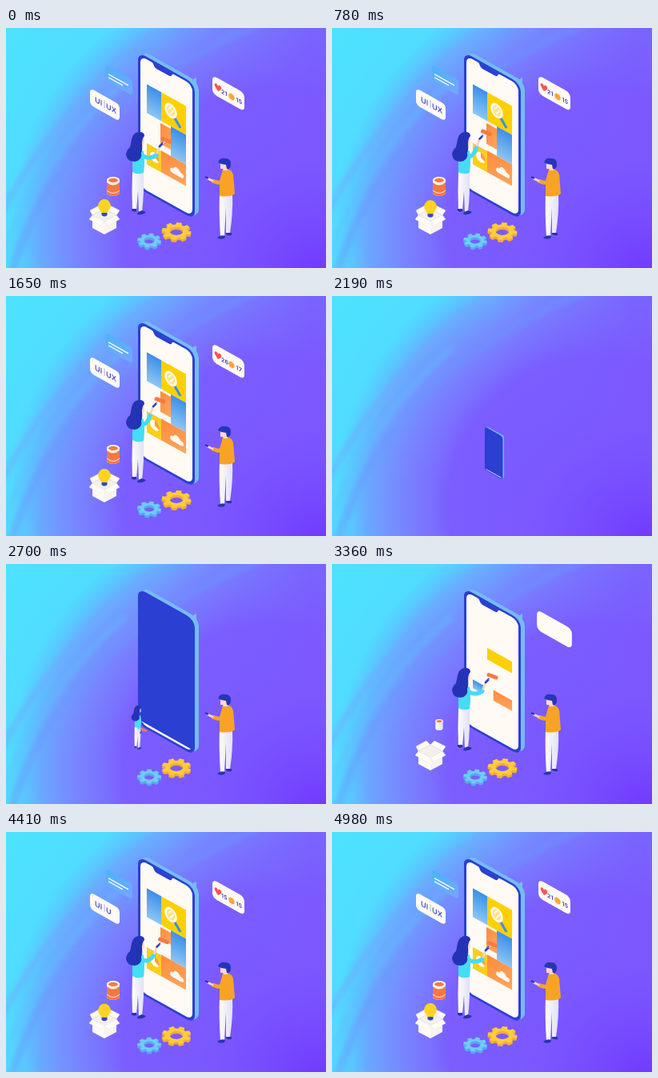
An HTML page for the animation above (5010 ms loop, 400 px wide and 300 px high).

```html
<!DOCTYPE html>
<html lang="en">
<head>
<meta charset="utf-8">
<title>Isometric app design</title>
<style>
html, body { margin: 0; width: 100%; height: 100%; overflow: hidden; background: #7b5dff; }
svg { display: block; width: 100vw; height: 100vh; }
text { font-family: Inter, Lato, sans-serif; font-weight: 500; fill: #3038c0; }
#counts text { font-size: 7px; font-weight: 600; letter-spacing: .2px; }
</style>
</head>
<body>
<svg viewBox="0 0 400 300">
<defs>
  <radialGradient id="sky" gradientUnits="userSpaceOnUse" cx="330" cy="260" r="430">
    <stop offset="0" stop-color="#7a54ff"/><stop offset=".43" stop-color="#7b5eff"/>
    <stop offset=".48" stop-color="#7a70ff"/><stop offset=".56" stop-color="#7884ff"/>
    <stop offset=".62" stop-color="#7297ff"/><stop offset=".67" stop-color="#68aaff"/>
    <stop offset=".71" stop-color="#5bc4ff"/><stop offset=".76" stop-color="#50dcff"/>
    <stop offset="1" stop-color="#4ce4ff"/>
  </radialGradient>
  <linearGradient id="dusk"><stop offset=".5" stop-color="#7a60ff" stop-opacity="0"/><stop offset=".95" stop-color="#7b58ff" stop-opacity=".8"/></linearGradient>
  <radialGradient id="corner" gradientUnits="userSpaceOnUse" cx="390" cy="310" r="170"><stop offset="0" stop-color="#7038ff"/><stop offset="1" stop-color="#7a54ff" stop-opacity="0"/></radialGradient>
  <linearGradient id="blue" x2="0" y2="1"><stop offset="0" stop-color="#3d8fe8"/><stop offset="1" stop-color="#8cc6f4"/></linearGradient>
  <linearGradient id="orange" x2="1" y2="1"><stop offset="0" stop-color="#ff8a3c"/><stop offset="1" stop-color="#ffa75e"/></linearGradient>
  <linearGradient id="glass" x2="1" y2="1"><stop offset="0" stop-color="#46b4f8"/><stop offset="1" stop-color="#78a8ff"/></linearGradient>
  <linearGradient id="cloth" x2="1"><stop offset="0" stop-color="#fffdfa"/><stop offset="1" stop-color="#dfe0f6"/></linearGradient>
  <filter id="soft" x="-20%" y="-20%" width="140%" height="140%"><feGaussianBlur stdDeviation="3"/></filter>
  <clipPath id="wipe"><rect id="wipeRect" x="0" width="72"/></clipPath>
  <clipPath id="canBody"><path d="M126 190V206A8 4 0 0 0 142 206V190Z"/></clipPath>
</defs>

<rect width="400" height="300" fill="url(#sky)"/>
<rect width="400" height="300" fill="url(#dusk)"/>
<rect width="400" height="300" fill="url(#corner)"/>
<g fill="none" filter="url(#soft)">
  <path d="M-10 240Q60 100 205 -10" stroke="#70a8ff" stroke-width="7" opacity=".6"/>
  <path d="M5 310Q60 130 240 32T420 -5" stroke="#6c96ff" stroke-width="10" opacity=".45"/>
  <path d="M-10 300Q40 160 150 65" stroke="#5cc0ff" stroke-width="8" opacity=".4"/>
</g>

<g id="phone">
  <rect width="71" height="169" rx="10" fill="#74bcf0" transform="matrix(1 .56 0 1 170 28)"/>
  <path d="M232 65L238 62V233L233 235Z" fill="#74bcf0"/>
  <g transform="matrix(1 .56 0 1 165 32)">
    <rect y="-2" width="71" height="170" rx="10" fill="#2b3fd2"/>
    <g clip-path="url(#wipe)">
      <rect x="3" y="1" width="65" height="164" rx="8" fill="#fffaf3"/>
      <path d="M17 .5H45Q43 1 42 4Q41 6 39 6H23Q21 6 20 4Q19 1 17 .5Z" fill="#2b3fd2"/>
    </g>
    <rect id="tileA" fill="url(#blue)"/>
    <rect id="tileB" fill="#ffd000"/>
    <rect id="tileC" fill="url(#blue)"/>
    <rect id="tileD" fill="url(#blue)"/>
    <rect id="tileE" fill="#ffcf18"/>
    <rect id="tileF" fill="url(#orange)"/>
    <rect id="paint" x="28" y="71" width="13" fill="url(#orange)"/>
    <g id="lens">
      <path d="M46 55L52 62" stroke="#3f8fe8" stroke-width="4" stroke-linecap="round"/>
      <ellipse cx="41" cy="48.5" rx="6.5" ry="7.5" fill="#ffe58a" stroke="#fffaf3" stroke-width="2.6"/>
      <path d="M38 48L42 43M40 53L45 46" stroke="#fffaf3" stroke-width="1.4"/>
    </g>
    <g id="pie"><circle cx="21" cy="118" r="6" fill="#fffaf3"/><path d="M21 118V112A6 6 0 0 1 26 121Z" fill="#ff9c3b"/></g>
    <path id="cloud" d="M43 125Q40 125 40 122Q41 118 44 119Q46 114 50 116Q52 117 53 119Q57 119 57 122Q57 125 54 125Z" fill="#fffaf3"/>
  </g>
</g>

<g id="gears"></g>

<g id="can">
  <path d="M126 190V206A8 4 0 0 0 142 206V190Z" fill="url(#cloth)"/>
  <g clip-path="url(#canBody)">
    <path id="label" fill="#f57843"/>
    <path d="M126 203Q134 210 142 203" fill="none" stroke="#ffe3d3"/>
  </g>
  <ellipse cx="134" cy="190" rx="8" ry="4" fill="#fffaf3"/>
  <ellipse cx="134" cy="190.3" rx="5.8" ry="2.6" fill="#f57843"/>
</g>

<g id="box">
  <path d="M108 234L123 226L138 234L123 242Z" fill="#f5f0ec"/>
  <path d="M108 234L123 226L118 221L105 228ZM138 234L123 226L128 221L142 228Z" fill="#fffaf3" stroke="#ebe4e0" stroke-width=".5"/>
  <g id="bulb">
    <path d="M119.5 6H126.5V12Q123 15 119.5 12Z" fill="#3148c8"/>
    <path d="M123 -8A8 8 0 0 1 129 5Q127 7 127 9H119Q119 7 117 5A8 8 0 0 1 123 -8Z" fill="#ffd321"/>
  </g>
  <path d="M108 234L123 242V258L108 250Z" fill="#fffaf3"/>
  <path d="M138 234L123 242V258L138 250Z" fill="#f8f3ee"/>
  <path d="M108 234L123 242L118 247L104 239ZM138 234L123 242L128 247L142 239Z" fill="#fffdf8" stroke="#ebe4e0" stroke-width=".5"/>
</g>

<g id="note"><g transform="matrix(1 .56 0 1 125 46)">
  <rect width="33" height="20" rx="4" fill="url(#glass)" opacity=".9"/>
  <path id="lines" fill="none" stroke="#fff" stroke-width="1.4"/>
</g></g>
<g id="title"><g transform="matrix(1 .56 0 1 105 75)">
  <rect width="37" height="21" rx="5" fill="#fffaf3"/>
  <text id="word1" x="6" y="14" font-size="9"></text>
  <path id="caret" d="M18 5.5V15" stroke="#8d9be8" stroke-width=".8"/>
  <text id="word2" x="20" y="14" font-size="9"></text>
</g></g>
<g id="likes"><g transform="matrix(1 .56 0 1 258 59)">
  <rect width="40" height="23" rx="5.5" fill="#fffaf3"/>
  <g id="counts">
    <path d="M7 16Q0 10 4 8Q6 7 7 10Q8 7 10 8Q14 10 7 16Z" fill="#f45656"/>
    <text id="hearts" x="11" y="16"></text>
    <circle cx="24" cy="13.5" r="3.8" fill="#ffa538"/>
    <text id="smiles" x="29.5" y="16"></text>
  </g>
</g></g>

<g id="man">
  <path d="M267 207H283Q284 230 280 256L275 257L275 224L273 260L268 261Q266 230 267 207Z" fill="url(#cloth)"/>
  <path d="M264 262Q269 258 274 260L273 263Q267 265 264 262ZM275 256H282V259Q279 260 275 258Z" fill="#2934af"/>
  <path d="M271 177Q281 174 284 183L286 207Q281 212 267 210L267 191Z" fill="#f9a326"/>
  <path d="M271 184Q274 195 264 193L258 191" fill="none" stroke="#f9a326" stroke-width="5"/>
  <path d="M258 191L252 188" stroke="#ffd2bd" stroke-width="2.8" stroke-linecap="round"/>
  <path d="M249 186L253 188" stroke="#2934af" stroke-width="2.5"/>
  <path d="M268 168H277V178H272L271 176H268Z" fill="#ffd9cb"/>
  <path d="M265 168Q267 162 274 163Q282 163 281 172Q280 177 276 176L275 171Q270 171 265 168Z" fill="#2636b6"/>
</g>

<g id="woman">
  <g transform="translate(-3 0)">
    <path d="M161 180H175Q176 204 173 230H169L168 204L166 228H161Q160 204 161 180Z" fill="url(#cloth)"/>
    <path d="M160 226H166V229Q162 231 160 228ZM168 230L173 228L178 230Q175 234 167 233Z" fill="#2934af"/>
    <path d="M161 155Q169 150 175 154Q177 168 175 181Q167 184 161 180Z" fill="#45dcf5"/>
  </g>
  <path id="sleeve" fill="none" stroke="#45dcf5" stroke-width="5.2" stroke-linecap="round"/>
  <path id="hand" stroke="#ffd2bd" stroke-width="2.8" stroke-linecap="round"/>
  <g transform="translate(-3 0)">
    <path d="M169 136H175L176 143Q175 147 173 147V153H168Z" fill="#ffd9cb"/>
    <path d="M160 139Q162 130 170 130Q176 130 176 135Q173 138 173 145Q174 152 172 156Q174 165 164 167Q154 167 153 158Q154 152 158 149Q159 145 160 139Z" fill="#2433b5"/>
  </g>
  <g id="roller">
    <path d="M-8 8L-4 4" stroke="#2b3fd2" stroke-width="2.6" stroke-linecap="round"/>
    <path d="M-4 5L0 0" stroke="#e9e7f5" stroke-width="1.2"/>
    <path d="M-4 -1.5L5 2" stroke="#f57b45" stroke-width="5" stroke-linecap="round"/>
  </g>
</g>
</svg>

<script>
const LOOP = 5010, STEP = 30, CUT = 2160;
const $ = id => document.getElementById(id);
const set = (id, attrs) => { for (const k in attrs) $(id).setAttribute(k, attrs[k]); };
const span = (t, start, length) => Math.min(1, Math.max(0, (t - start) / length));
const easeOut = x => 1 - (1 - x) ** 3;
const backOut = x => 1 + 2.7 * (x - 1) ** 3 + 1.7 * (x - 1) ** 2;
const smooth = x => (1 - Math.cos(Math.PI * x)) / 2;
const mix = (a, b, k) => a + (b - a) * k;

function keyed(t, keys, ease = x => x) {
  let i = 0;
  while (i < keys.length - 2 && t > keys[i + 1][0]) i++;
  const [[t0, a], [t1, b]] = keys.slice(i, i + 2);
  return mix(a, b, ease(span(t, t0, t1 - t0)));
}

function pop(id, t, start, length, x, y) {
  const s = backOut(span(t, start, length));
  set(id, { transform: `translate(${x} ${y}) scale(${Math.max(0, s)}) translate(${-x} ${-y})` });
}

// Tiles in the upper rows rise into place.
function riseTile(id, t, start, x, y, width, h) {
  const k = easeOut(span(t, start, 350));
  set(id, { x, y: y + (h + 5) * (1 - k), width, height: h * k });
}

// Tiles in the bottom row unfold from an upper corner.
function unfoldTile(id, t, start, x, y, w, h, fromRight) {
  const width = w * easeOut(span(t, start - 60, 350));
  const height = h * easeOut(span(t, start, 350));
  set(id, { x: fromRight ? x + w - width : x, y, width, height });
}

function gearPath(r, turn) {
  const teeth = 8, pitch = 2 * Math.PI / teeth, squash = .6;
  let d = '';
  for (let i = 0; i < teeth; i++) {
    [[-.33, .76], [-.22, 1], [.22, 1], [.33, .76]].forEach(([offset, k]) => {
      const a = (i + offset) * pitch + turn;
      d += `${d ? 'L' : 'M'}${r * k * Math.cos(a)} ${r * k * Math.sin(a) * squash}`;
    });
  }
  const h = r * .45;
  return d + `ZM${-h} 0a${h} ${h * squash} 0 1 0 ${2 * h} 0a${h} ${h * squash} 0 1 0 ${-2 * h} 0Z`;
}

const gears = [
  { x: 179, y: 265.5, r: 15, top: '#70cbfb', side: '#58a9ee', dir: -1 },
  { x: 213, y: 254, r: 18.5, top: '#ffcc3a', side: '#f6aa3a', dir: 1 }
];
$('gears').innerHTML = gears.map((g, i) => `<g id="gear${i}">` +
  [3, 2, 1, 0].map(y => `<path fill-rule="evenodd" transform="translate(${g.x} ${g.y + y})" fill="${y ? g.side : g.top}"/>`).join('') + '</g>').join('');

const strokeKeys = [[2700, .6], [2950, 0], [3360, 1], [3870, 0], [4240, 1], [4610, 0], [4980, 1], [5060, 1],
  [5710, 0], [6210, 1], [6690, 0], [7170, 1]];

function draw(time) {
  // The scene is built after the cut and carries on across the loop seam.
  const t = time < CUT ? time + LOOP : time;

  pop('phone', t, 2160, 400, 203, 225);
  set('wipeRect', { y: mix(162.5, 0, smooth(span(t, 2690, 320))), height: 168 });
  riseTile('tileA', t, 3400, 11, 32, 18, 36);
  riseTile('tileB', t, 3305, 29, 32, 31, 36);
  riseTile('tileC', t, 3450, 41, 68, 19, 37);
  unfoldTile('tileD', t, 3300, 11, 106, 18, 26);
  unfoldTile('tileE', t, 3500, 11, 106, 18, 26);
  unfoldTile('tileF', t, 3290, 29, 105, 31, 27, true);
  set('paint', { height: 26 * span(t, 3900, 900) });
  pop('lens', t, 3500, 300, 44, 50);
  pop('pie', t, 3600, 250, 21, 118);
  pop('cloud', t, 3550, 300, 49, 121);

  gears.forEach((g, i) => {
    const d = gearPath(g.r, g.dir * time / LOOP * 6 * Math.PI / 4 + .2);
    for (const p of $('gear' + i).children) p.setAttribute('d', d);
    pop('gear' + i, t, 2220 + i * 60, 380, g.x, g.y);
  });

  pop('man', t, 2300, 380, 273, 261);
  pop('woman', t, 2645, 400, 164, 230);
  const p = keyed(t, strokeKeys, smooth);
  const raised = smooth(span(t, 2800, 450));
  const rx = mix(179, mix(192, 200, p), raised), ry = mix(187, mix(130, 140, p), raised);
  const hx = rx - 8, hy = ry + 8;
  set('roller', { transform: `translate(${rx} ${ry})` });
  set('sleeve', { d: `M168 157Q${mix(174, 177, p)} 166 ${hx - 4} ${mix(184, hy + 11, raised)}` });
  set('hand', { d: `M${hx - 3} ${mix(187, hy + 8, raised)}L${hx} ${hy}` });

  pop('box', t, 2980, 350, 123, 252);
  const bob = -Math.cos(2 * Math.PI * (t - LOOP) / 1113);
  set('bulb', { transform: `translate(0 ${mix(246, 223 + bob, backOut(span(t, 4100, 400)))})`,
    visibility: t > 4100 ? 'visible' : 'hidden' });
  pop('can', t, 3298, 400, 134, 205);
  const fill = mix(207, 193, span(t, 3820, 450));
  set('label', { d: `M126 ${fill}Q134 ${fill + 7} 142 ${fill}V212H126Z`, visibility: t > 3820 ? 'visible' : 'hidden' });

  pop('note', t, 3345, 400, 142, 66);
  const line = (x, y, w, start) => t > start ? `M${x} ${y}h${w * span(t, start, 250)}` : '';
  set('lines', { d: line(3, 10, 25, 3840) + line(3, 14, 18, 4000) });
  pop('title', t, 3760, 420, 123.5, 95);
  const typed = Math.floor(4 * span(t, 4120, 360));
  $('word1').textContent = 'UI'.slice(0, typed);
  $('word2').textContent = 'UX'.slice(0, Math.max(0, typed - 2));
  set('caret', { visibility: t > 4120 ? 'visible' : 'hidden' });

  pop('likes', t, 3150, 400, 278, 82);
  set('counts', { visibility: t > 3600 ? 'visible' : 'hidden' });
  $('hearts').textContent = Math.floor(keyed(t, [[3600, 0], [4734, 21], [5860, 21], [6560, 26]]) + .01);
  $('smiles').textContent = Math.floor(keyed(t, [[3600, 0], [4275, 15], [5860, 15], [6560, 17]]) + .01);
}

const begin = performance.now();
function tick() {
  const time = (performance.now() - begin) % LOOP;
  draw(Math.floor(time / STEP) * STEP);
  requestAnimationFrame(tick);
}
tick();
</script>
</body>
</html>
```
